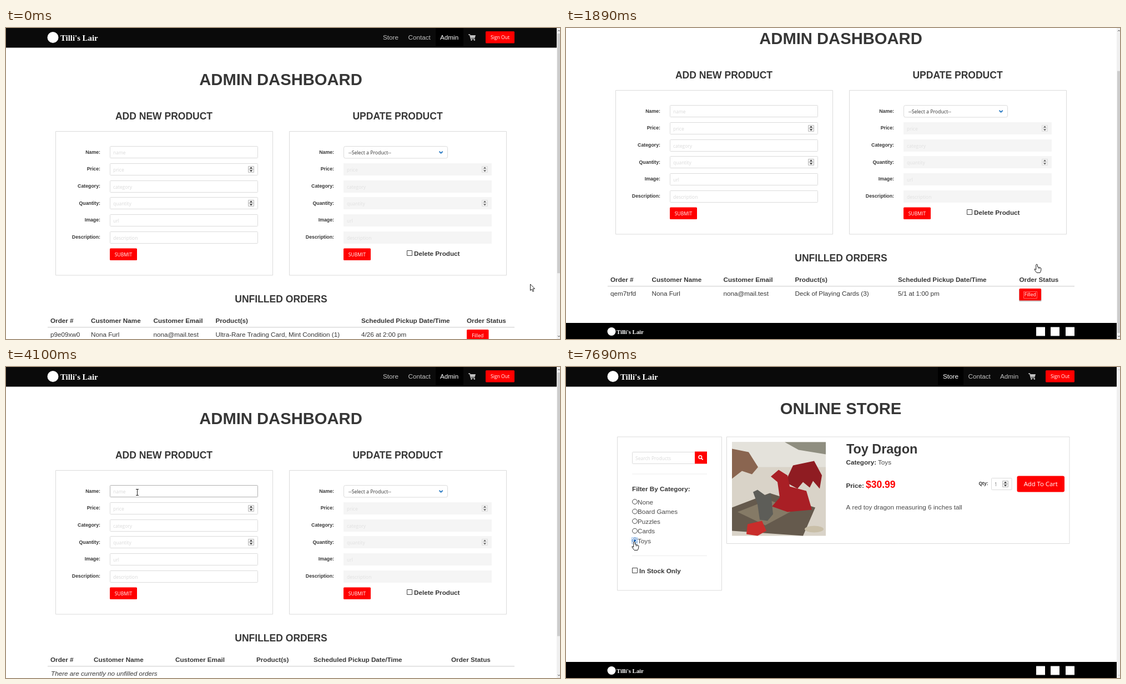
Animation of 998x561 px, one loop 7990 ms. Source, as an HTML page with a canvas:

```html
<!DOCTYPE html>
<html lang="en">
<head>
<meta charset="utf-8">
<title>Shop admin walkthrough</title>
<style>
html, body { margin: 0; width: 100%; height: 100%; overflow: hidden; background: #fff; }
canvas { display: block; width: 998px; height: 561px; }
</style>
</head>
<body>
<canvas id="stage" width="998" height="561"></canvas>
<script>
const ctx = document.getElementById('stage').getContext('2d');
const W = 998, H = 561, LOOP = 7990;
const SANS = '"Liberation Sans", Arial, sans-serif';
const UI = '"Open Sans", "Noto Sans", sans-serif';
const SERIF = '"Liberation Serif", serif';
const INK = '#363636', RED = '#ff0000', LINE = '#dbdbdb', NAV = '#c2c2c2';
const BASE = 11.69, SMALL = 8.77, STEP = 30.67;
const SHOP = "Tilli's Lair", BUYER = 'Nona Furl', MAIL = 'nona@mail.test';

// Bursts of activity: start, end, number of screen updates
const BURSTS = [
  [320, 1100, 11], [1410, 1570, 3], [1740, 1890, 3], [2100, 2650, 8],
  [2810, 3280, 7], [3590, 3800, 4], [3970, 4100, 3], [4330, 4500, 3],
  [4650, 5030, 6], [5200, 5270, 2], [5410, 5480, 2], [5640, 5710, 2],
  [5940, 6260, 5], [6490, 6490, 1], [6660, 7230, 8], [7390, 7390, 1],
  [7530, 7690, 3]
];
const SCROLL = [
  [0, 0], [270, 0], [320, 14], [554, 92], [632, 115], [710, 133],
  [1739, 133], [1740, 74], [3109, 74], [3110, 70], [3520, 70],
  [3590, 52], [3800, 0]
];
const POINTER = [
  [0, 944, 462, arrow], [710, 944, 462, arrow], [880, 915, 446, arrow],
  [1020, 860, 429, hand], [1100, 848, 426, hand], [2030, 848, 426, hand],
  [2170, 880, 419, arrow], [2340, 919, 440, arrow], [2500, 880, 470, arrow],
  [2560, 850, 481, hand], [2650, 847, 482, hand], [2890, 847, 482, hand],
  [3040, 862, 475, arrow], [3280, 901, 449, arrow], [3900, 901, 449, arrow],
  [4100, 236, 226, beam], [4650, 236, 226, beam], [4950, 230, 385, beam],
  [5030, 226, 411, hand], [5150, 226, 411, hand], [5270, 346, 379, beam],
  [5410, 346, 379, beam], [5480, 212, 405, hand], [5640, 212, 405, hand],
  [5710, 324, 426, arrow], [5860, 324, 426, arrow], [5940, 729, 55, arrow],
  [6180, 694, 16, hand], [6260, 693, 13, hand], [6660, 693, 13, arrow],
  [7150, 128, 312, arrow], [7230, 123, 315, hand]
];

function snap(t) {
  let out = 0;
  for (const [a, b, n] of BURSTS) {
    if (t < a) break;
    const d = n > 1 ? (b - a) / (n - 1) : 1;
    out = Math.min(b, a + Math.floor((t - a) / d + 1e-6) * d);
  }
  return out;
}

function sample(keys, t) {
  let i = 0;
  while (i < keys.length - 1 && keys[i + 1][0] <= t) i++;
  const a = keys[i], b = keys[i + 1];
  if (!b) return a.slice(1);
  const k = (t - a[0]) / (b[0] - a[0]);
  return a.slice(1).map((v, j) => typeof v === 'number' ? v + (b[j + 1] - v) * k : v);
}

// y is the optical middle of the capitals
function text(s, x, y, size = BASE, color = INK, style = '', align = 'left', font = SANS) {
  ctx.font = `${style} ${size}px ${font}`;
  ctx.textAlign = align;
  ctx.fillStyle = color;
  ctx.fillText(s, x, y + size * 0.36);
}
const bold = (s, x, y, size = BASE, align = 'left', color = INK) => text(s, x, y, size, color, 'bold', align);
const ui = (s, x, y, color, size = 8.6, align = 'left') => text(s, x, y, size, color, '', align, UI);

function rect(x, y, w, h, fill) {
  ctx.fillStyle = fill;
  ctx.fillRect(x, y, w, h);
}

function box(x, y, w, h, fill, stroke, r = 0) {
  ctx.beginPath();
  ctx.roundRect(x, y, w, h, r);
  if (fill) { ctx.fillStyle = fill; ctx.fill(); }
  if (stroke) { ctx.strokeStyle = stroke; ctx.lineWidth = 1; ctx.stroke(); }
}

function disc(x, y, r, fill) {
  ctx.beginPath();
  ctx.arc(x, y, r, 0, 7);
  ctx.fillStyle = fill;
  ctx.fill();
}

function poly(pts, fill, stroke) {
  ctx.beginPath();
  for (let i = 0; i < pts.length; i += 2) ctx.lineTo(pts[i], pts[i + 1]);
  ctx.closePath();
  if (fill) { ctx.fillStyle = fill; ctx.fill(); }
  if (stroke) { ctx.strokeStyle = stroke; ctx.lineWidth = 1; ctx.stroke(); }
}

function strokeLine(pts, color, width) {
  ctx.beginPath();
  for (let i = 0; i < pts.length; i += 2) ctx.lineTo(pts[i], pts[i + 1]);
  ctx.strokeStyle = color;
  ctx.lineWidth = width;
  ctx.stroke();
}

function button(label, x, y, w, h, focus, size = 8.6, r = 1.5) {
  if (focus) box(x - 0.5, y + 1, w + 1, h + 0.8, 'rgba(0,0,0,.25)', null, r);
  box(x, y, w, h, RED, null, r);
  ui(label, x + w / 2, y + h / 2 + 0.4, '#fff', size, 'center');
  if (!focus) return;
  const half = ctx.measureText(label).width / 2 + 1.5;
  ctx.setLineDash([1, 1]);
  box(Math.round(x + w / 2 - half) + 0.5, Math.round(y + h / 2 - 6) + 0.5, Math.round(half * 2), 12, null, '#ffc8c8');
  ctx.setLineDash([]);
}

function spinner(x, y, faded) {
  const edge = faded ? '#dedede' : '#bdbdbd', ink = faded ? '#555' : '#222';
  box(x + 0.5, y - 5.5, 10, 5.5, '#f2f2f2', edge);
  box(x + 0.5, y, 10, 5.5, '#f2f2f2', edge);
  poly([x + 3, y - 1.5, x + 5.5, y - 4.2, x + 8, y - 1.5], ink);
  poly([x + 3, y + 1.5, x + 5.5, y + 4.2, x + 8, y + 1.5], ink);
}

function checkbox(x, y) {
  box(x + 0.5, y + 0.5, 9, 9, '#fff', '#444');
}

function brand(x, y, r, textX, size) {
  disc(x, y, r, '#fff');
  text(SHOP, textX, y + 0.8, size, '#fff', 'bold', 'left', SERIF);
}

function header(page, hover) {
  rect(0, 0, 992, 35.5, '#0a0a0a');
  if (page === 'store') rect(670, 0, 46, 34, '#000');
  else rect(774, 0, 50, 34, '#000');
  brand(84.5, 17, 10, 98, 14.8);
  text('Store', 679, 17, BASE, page === 'store' || hover ? '#fff' : NAV);
  text('Contact', 724.5, 17, BASE, NAV);
  text('Admin', 782, 17, BASE, page === 'admin' ? '#fff' : NAV);
  strokeLine([833, 12, 835.5, 12, 837.5, 19.5, 844.5, 19.5], NAV, 1.4);
  poly([836, 13, 846, 13, 844.6, 18, 837.4, 18], NAV);
  disc(838.5, 21.6, 1.3, NAV);
  disc(843.8, 21.6, 1.3, NAV);
  button('Sign Out', 864, 6, 52, 21.5);
}

function footer(y) {
  rect(0, y, 992, 29, '#000');
  brand(82, y + 15.5, 7.5, 91, 10.7);
  for (const x of [847, 873, 900]) rect(x, y + 7.5, 16, 16, '#fff');
}

function scrollbar(max, pos) {
  rect(992, 0, 6, H, '#f0f0f0');
  const ink = max ? '#555' : '#c8c8c8';
  strokeLine([994, 6, 996, 4, 998, 6], ink, 1);
  strokeLine([994, 555, 996, 557, 998, 555], ink, 1);
  if (!max) return;
  const len = 300000 / (H + max);
  rect(993, 10 + (540 - len) * pos / max, 5, len, '#cdcdcd');
}

const FIELDS = ['name', 'price', 'category', 'quantity', 'url', 'description'];
const LABELS = ['Name:', 'Price:', 'Category:', 'Quantity:', 'Image:', 'Description:'];

function form(x, title, height, disabled, values, focus, hover) {
  bold(title, x + 195.5, 159, 17.53, 'center');
  box(x + 0.5, 186.5, 391, height, '#fff', LINE);
  LABELS.forEach((label, i) => {
    const y = 224.4 + i * STEP, top = Math.round(y - 11) + 0.5;
    bold(label, x + 81, y - 0.9, SMALL, 'right');
    if (disabled && i === 0) {
      box(x + 98.5, 213.5, 187, 21.5, '#fff', LINE, 3);
      ui('--Select a Product--', x + 107, 224.8, INK, 8.75);
      strokeLine([x + 270.5, 222.8, x + 273.6, 225.8, x + 276.7, 222.8], '#2b7bc4', 1.9);
      return;
    }
    if (disabled) {
      rect(x + 98, top - 0.5, 267, 22, '#f5f5f5');
    } else {
      if (focus === i) box(x + 97, top - 1.2, 268.5, 23.4, 'rgba(50,115,220,.25)', null, 2);
      box(x + 98.5, top, 266, 21, '#fff', focus === i ? '#3273dc' : hover === i ? '#b0b0b0' : LINE, 1);
    }
    const value = values[i];
    ui(value || FIELDS[i], x + 104, y + 0.9, value ? INK : disabled ? '#e0e0e0' : '#d9d9d9', 8.5);
    if (i % 2 && i < 4) spinner(x + 347, Math.round(y), disabled);
  });
}

const COLUMNS = [
  [80, 158, 305, 451, 554, 802],
  [80, 154.5, 283.5, 412.5, 598, 816.5],
  [80, 153, 265.5, 377.5, 640, 830]
];
const ORDERS = [
  ['p9e09xw0', ['Ultra-Rare Trading Card, Mint Condition (1)', 'Classic Chess Set (1)', '500 Piece Puzzle (2)'], '4/26 at 2:00 pm', 59],
  ['qem7trfd', ['Deck of Playing Cards (3)'], '5/1 at 1:00 pm', 28]
];

function orderTable(y, count, focus) {
  const cols = COLUMNS[count];
  bold('UNFILLED ORDERS', 495.5, y - 51.5, 17.53, 'center');
  ['Order #', 'Customer Name', 'Customer Email', 'Product(s)', 'Scheduled Pickup Date/Time', 'Order Status']
    .forEach((s, i) => bold(s, cols[i], y - 12.3));
  rect(75, y - 1, 841, 1.5, LINE);
  if (!count) text('There are currently no unfilled orders', 81, y + 12.6, BASE, INK, 'italic');
  ORDERS.slice(2 - count).forEach(([id, items, when, height], row) => {
    if (row) {
      rect(75, y, 841, height, '#fafafa');
      rect(75, y - 0.5, 841, 1, LINE);
    }
    [id, BUYER, MAIL].forEach((s, i) => text(s, cols[i], y + 12.8));
    items.forEach((s, i) => text(s, cols[3], y + 12.8 + i * 17.53));
    text(when, cols[4], y + 12.8);
    button('Filled', cols[5], y + 4, 39.5, 21.5, focus && !row);
    y += height;
  });
}

function typed(t) {
  if (t >= 5640) return [];
  return [
    t >= 4490 ? 'Toy Dragon' : t >= 4400 ? 'Toy' : '',
    t >= 4650 ? '30.99' : '',
    t >= 4720 ? 'Toys' : '',
    t >= 4800 ? '10' : '',
    t >= 4870 ? 'images/toy-dragon.jpg' : '',
    t >= 5410 ? 'A red toy dragon measuring 6 inches tall' : ''
  ];
}

function activeField(t) {
  if (t < 4330 || t >= 5480) return -1;
  if (t < 4650) return 0;
  return t >= 5410 ? 5 : Math.min(5, 1 + Math.floor((t - 4650) / 75));
}

function adminPage(t) {
  const [pos] = sample(SCROLL, t);
  const count = t < 1740 ? 2 : t < 3110 ? 1 : 0;
  const added = t >= 5640, shift = added ? 26 : 0;
  const max = [70, 74, 133][count] + shift;
  ctx.save();
  ctx.translate(0, -Math.round(pos));
  header('admin', t >= 6170);
  bold('ADMIN DASHBOARD', 495, 92, 29.2, 'center');
  form(89, 'ADD NEW PRODUCT', 259.5 + shift, false, typed(t), activeField(t), t >= 4100 && t < 4330 ? 0 : -1);
  form(510, 'UPDATE PRODUCT', 259.5, true, []);
  button('SUBMIT', 187, 397.5, 49, 21.5, t >= 5480);
  button('SUBMIT', 608, 397.5, 49, 21.5);
  checkbox(722, 401);
  bold('Delete Product', 735, 406.5);
  if (added) text('New Product Added!', 231.5, 437, BASE, '#35b268');
  orderTable(540 + shift, count, t >= 1410);
  footer(H + max - 29);
  ctx.restore();
  scrollbar(max, pos);
  if (t >= 6490) {
    box(-0.5, 547.5, 193, 15, '#f2f2f2', '#c4c4c4', 2);
    ui('https://tillis-lair.test/online-store/index', 3, 554.5, '#444');
  }
}

function dragonPhoto() {
  rect(0, 0, 169, 169, '#d9d3c8');
  rect(0, 0, 169, 45, '#e4e2db');
  poly([95, 0, 169, 0, 169, 22, 120, 14], '#8f8e80');
  poly([0, 12, 30, 18, 47, 45, 36, 58, 18, 52, 0, 66], '#8a6550');
  poly([0, 118, 68, 92, 150, 118, 128, 169, 0, 160], '#655a4d');
  poly([10, 126, 66, 104, 112, 122, 60, 150], '#857a66');
  poly([96, 72, 110, 42, 148, 34, 162, 60, 158, 84, 146, 70, 140, 82, 128, 72, 118, 84], '#8f1c22');
  poly([70, 62, 84, 50, 100, 60, 104, 80, 134, 88, 144, 122, 100, 126, 72, 116, 86, 100, 82, 72], '#a91f25');
  poly([38, 90, 46, 86, 60, 96, 70, 92, 74, 130, 64, 142, 50, 140, 46, 112], '#5d5d58');
  poly([28, 148, 54, 142, 62, 160, 46, 169, 26, 166], '#c92d2b');
  ctx.beginPath();
  ctx.ellipse(148, 157, 17, 6, 0, 0, 7);
  ctx.fillStyle = '#c9bfa8';
  ctx.fill();
}

function plainPhoto(a, b) {
  const g = ctx.createLinearGradient(0, 0, 169, 169);
  g.addColorStop(0, a);
  g.addColorStop(1, b);
  rect(0, 0, 169, 169, g);
}

const STOCK = [
  ['Classic Chess Set', 'Board Games', '$24.99', 'A wooden chess set with a folding board', () => plainPhoto('#d8cdbb', '#6b5644')],
  ['500 Piece Puzzle', 'Puzzles', '$14.99', 'A landscape puzzle with 500 pieces', () => plainPhoto('#c7d4dc', '#5f7d8c')],
  ['Deck of Playing Cards', 'Cards', '$4.99', 'A standard deck of 52 playing cards', () => plainPhoto('#e6e2dc', '#8a4a48')],
  ['Toy Dragon', 'Toys', '$30.99', 'A red toy dragon measuring 6 inches tall', dragonPhoto]
];

function card([name, category, price, about, photo], y) {
  ctx.save();
  ctx.translate(0, y);
  box(289.5, 0, 617.5, 192.5, '#fff', LINE);
  ctx.save();
  ctx.translate(299, 9.5);
  photo();
  ctx.restore();
  bold(name, 505, 22, 23.4);
  bold('Category:', 504.5, 46);
  text(category, 562, 46, BASE, '#4a4a4a');
  bold('Price:', 504.5, 87.5);
  bold(price, 540, 86, 17.53, 'left', RED);
  bold('Qty:', 743.5, 84.3, 8.5);
  box(766.5, 74.5, 36.5, 21, '#fff', LINE, 1);
  ui('1', 772, 86, '#777');
  spinner(786, 85);
  button('Add To Cart', 812.5, 70.5, 85.5, 29, false, 11.3, 3);
  text(about, 504.5, 126.3, BASE, '#4a4a4a');
  ctx.restore();
}

function storePage(t) {
  const filtered = t >= 7530, chosen = t >= 7390 ? 4 : 0;
  header('store');
  bold('ONLINE STORE', 495, 74.5, 29.2, 'center');
  box(92.5, 126, 188, 277, '#fff', LINE);
  box(119.5, 153.5, 113, 21, '#fff', LINE, 1);
  ui('Search Products', 125, 164.5, '#d9d9d9', 8.5);
  rect(232, 152.5, 22, 22, RED);
  ctx.beginPath();
  ctx.arc(241.8, 162.6, 2.8, 0, 7);
  ctx.strokeStyle = '#fff';
  ctx.lineWidth = 1.5;
  ctx.stroke();
  strokeLine([243.8, 164.6, 246.6, 167.4], '#fff', 1.8);
  rect(119, 192.5, 135, 1, '#ededed');
  rect(119, 340, 135, 1, '#ededed');
  bold('Filter By Category:', 119, 220);
  ['None', 'Board Games', 'Puzzles', 'Cards', 'Toys'].forEach((s, i) => {
    const y = 243.3 + i * 17.53, on = i === chosen;
    ctx.beginPath();
    ctx.arc(124, y - 0.3, 4.4, 0, 7);
    ctx.strokeStyle = on && i ? '#2b6fc0' : '#444';
    ctx.lineWidth = 1;
    ctx.stroke();
    if (on) disc(124, y - 0.3, 2.4, i ? '#2b6fc0' : '#444');
    if (on && i) box(118.5, y - 5.8, 10, 11, null, '#9cc0ea');
    text(s, 129, y + 0.2, BASE, '#4a4a4a');
  });
  checkbox(119, 362);
  bold('In Stock Only', 132, 367.5);
  if (filtered) card(STOCK[3], 126);
  else STOCK.forEach((item, i) => card(item, 126 + i * 203));
  if (filtered) footer(532);
  scrollbar(filtered ? 0 : 440, 0);
}

function arrow(x, y) {
  poly([x + 0.5, y, x + 0.5, y + 11.5, x + 3.1, y + 9.2, x + 5, y + 13.4, x + 6.8, y + 12.6, x + 5, y + 8.5, x + 8.5, y + 8.3], '#fff', '#222');
}

function hand(x, y) {
  poly([x - 1.3, y + 1, x, y, x + 1.3, y + 1, x + 1.5, y + 5, x + 7, y + 6.5, x + 8, y + 8, x + 7.5, y + 12,
    x + 6, y + 15.5, x, y + 15.5, x - 4, y + 10, x - 3.8, y + 8.5, x - 1.3, y + 10], '#fff', '#222');
  strokeLine([x + 3.3, y + 6, x + 3.3, y + 8.5], '#222', 0.8);
  strokeLine([x + 5.3, y + 6.5, x + 5.3, y + 8.5], '#222', 0.8);
}

function beam(x, y) {
  strokeLine([x + 0.5, y - 5.5, x + 0.5, y + 5.5], '#222', 1);
  for (const dy of [-5.5, 5.5]) strokeLine([x - 2, y + dy, x + 3, y + dy], '#222', 1);
}

function draw(now) {
  const t = snap(now % LOOP + 5);
  rect(0, 0, W, H, '#fff');
  if (t < 6660) adminPage(t);
  else storePage(t);
  const [x, y, shape] = sample(POINTER, t);
  shape(Math.round(x), Math.round(y));
}

const start = performance.now();
function tick() {
  draw(performance.now() - start);
  requestAnimationFrame(tick);
}
tick();
</script>
</body>
</html>
```
